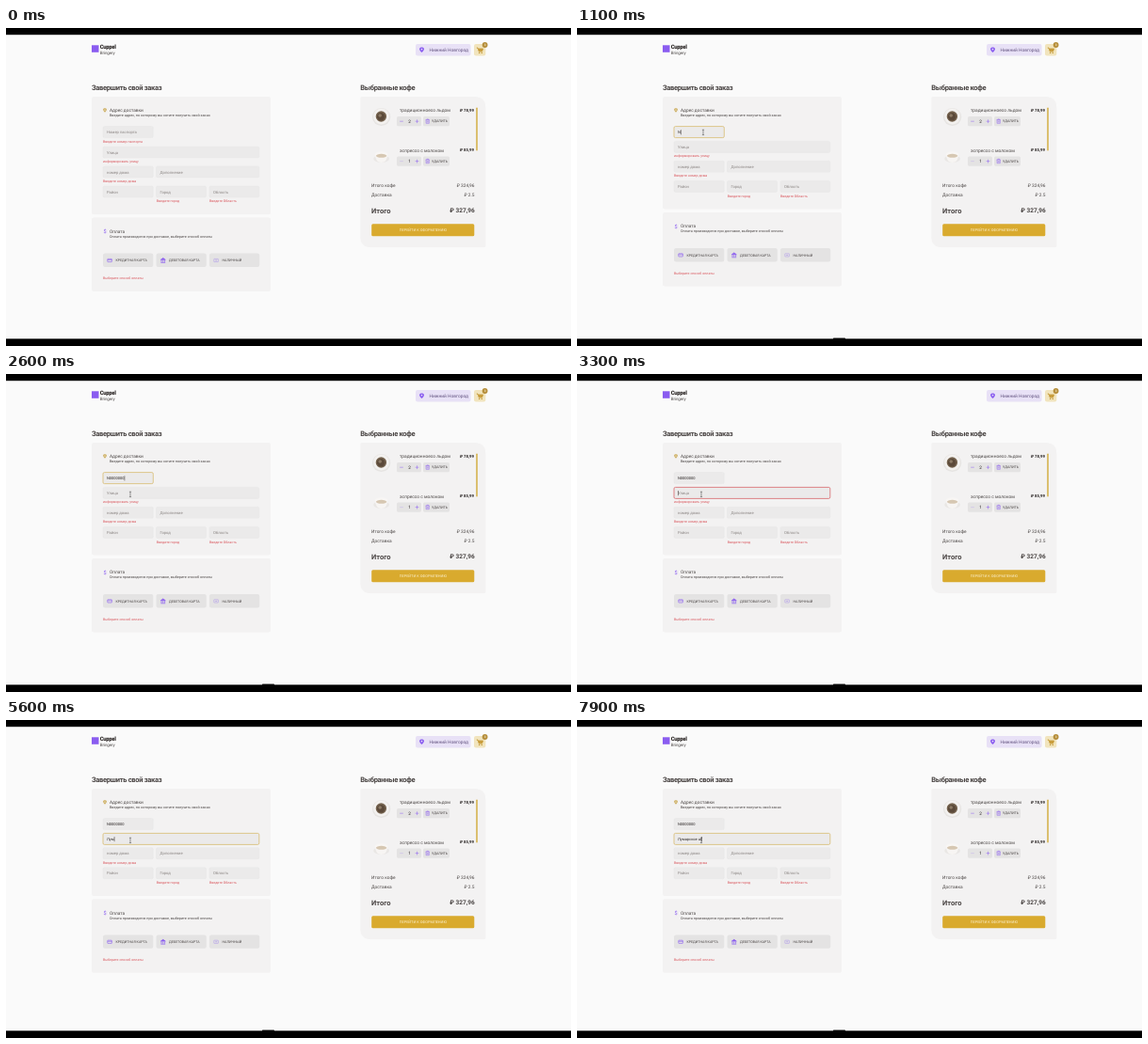
An HTML page for the animation above (8000 ms loop, 600x338 px).

```html
<!DOCTYPE html>
<html lang="ru">
<head>
<meta charset="utf-8">
<title>Оформление заказа</title>
<style>
html, body { margin: 0; width: 100%; height: 100%; overflow: hidden; background: #fafafa; }
svg { display: block; }
text { font-family: Roboto, "Noto Sans", sans-serif; text-rendering: geometricPrecision; white-space: pre; }
.head { font-weight: 600; letter-spacing: -.34px; }
.bold { font-weight: 700; }
.logo { font-weight: 800; letter-spacing: -.4px; }
.tight { letter-spacing: -.1px; }
</style>
</head>
<body>
<svg id="stage" width="600" height="338" viewBox="0 0 600 338"></svg>
<script>
const LOOP = 8000, ROW = 5.6;
const INK = '#4a4544', DARK = '#2c2726', HINT = '#8c8684', FIELD = '#ebeaea', LINE = '#e3e2e2',
  BUTTON = '#e4e3e3', CARD = '#f3f2f2', PURPLE = '#8a5cf0', GOLD = '#d9aa2e', RED = '#d9545b',
  FOCUS = '#d9bc72', ALERT = '#d8676c';
const PASSPORT = 'N0000000', PASSPORT_KEYS = [1100, 1500, 1600, 1700, 1800, 1900, 2000, 2100];
const STREET = 'Лумарское ш', STREET_KEYS = [5000, 5300, 5500, 5900, 6800, 6900, 7000, 7200, 7300, 7700, 7900];
const PASSPORT_FOCUS = 500, STREET_FOCUS = 3000;

const stage = document.getElementById('stage');
const pen = document.createElement('canvas').getContext('2d');

const rect = (x, y, w, h, fill, r = 0, extra = '') =>
  `<rect x="${x}" y="${y}" width="${w}" height="${h}" rx="${r}" fill="${fill}" ${extra}/>`;
const circle = (x, y, r, fill) => `<circle cx="${x}" cy="${y}" r="${r}" fill="${fill}"/>`;
const ellipse = (x, y, rx, ry, fill) => `<ellipse cx="${x}" cy="${y}" rx="${rx}" ry="${ry}" fill="${fill}"/>`;
const path = (d, stroke, width = .8, fill = 'none') =>
  `<path d="${d}" stroke="${stroke}" stroke-width="${width}" fill="${fill}"/>`;
// y is the middle of the capitals
const text = (s, x, y, size, fill = INK, cls = '', anchor = 'start') =>
  `<text x="${x}" y="${y + size * .355}" font-size="${size}" fill="${fill}" class="${cls}" text-anchor="${anchor}">${s}</text>`;
const shift = (dy, s) => `<g transform="translate(0 ${dy})">${s}</g>`;
const pin = (x, y, size, fill, hole) =>
  `<g transform="translate(${x} ${y}) scale(${size})">` +
  path('M0 3C-5 -1.5 -2 -3.2 0 -3.2S5 -1.5 0 3Z', 'none', 0, fill) + circle(0, -.8, .9, hole) + '</g>';
const error = (s, x, y) => text(s, x, y, 3.6, RED);
const typed = (s, keys, t) => s.slice(0, keys.filter(k => k <= t).length);

function field(x, y, w, hint, value = '', focused = false) {
  const border = !focused ? LINE : value ? FOCUS : ALERT;
  let s = rect(x, y, w, 12, FIELD, 1.5, `stroke="${border}" stroke-width="${focused ? .8 : .4}"`);
  s += value ? text(value, x + 4, y + 6.2, 4, DARK) : text(hint, x + 4, y + 6.2, 4.15, HINT);
  if (focused) {
    pen.font = '40px Roboto, "Noto Sans", sans-serif';
    s += rect(x + 4.1 + pen.measureText(value).width / 10, y + 3.6, .5, 5.2, DARK);
  }
  return s;
}

function payButton(x, w, label, icon) {
  return rect(x, 239.6, w, 14.4, BUTTON, 2) + icon + text(label, x + 13.5, 247, 3.6, INK);
}

function banknote(x, y, stroke) {
  return rect(x, y, 4.6, 3.2, 'none', .4, `stroke="${stroke}" stroke-width=".6"`);
}

function item(y, name, count, price) {
  const mid = y + 11.8, minus = count > 1 ? PURPLE : '#c3b2ea';
  return text(name, 418, y, 4.85) +
    text(price, 497, y, 4.3, DARK, 'bold', 'end') +
    rect(415, y + 6.7, 26, 10.2, BUTTON, 1.6) +
    path(`M418.2 ${mid}h3.6`, minus, .5) +
    text(count, 428.6, mid, 4.7, DARK, '', 'middle') +
    path(`M434.6 ${mid}h3.8m-1.9 -1.9v3.8`, PURPLE, .5) +
    rect(443, y + 6.7, 28, 10.2, BUTTON, 1.6) +
    path(`M445.6 ${mid - 1.6}h4.2m-2.9 0v-.7h1.6v.7m-2.4 0v3.7h3.2v-3.7m-2.1 1v1.8m1 0v-1.8`, PURPLE, .5) +
    text('УДАЛИТЬ', 452, mid, 3.65);
}

function header() {
  return rect(91, 18.3, 7.5, 7.5, PURPLE) +
    text('Cuppel', 99.8, 20, 6, DARK, 'logo') +
    text('Bringery', 99.8, 26.1, 4.5, INK, 'tight') +
    rect(435, 17, 58.5, 12.6, '#e8e1f6', 2) + pin(441.5, 23.4, .9, PURPLE, '#e8e1f6') +
    text('Нижний Новгород', 449.5, 23.4, 4.85, '#62537f') +
    rect(497, 17, 12.3, 12.6, '#f1e4bd', 2) +
    path('M499.8 21h1.2l1.2 4h3.4l.9-3h-5', '#c0942f', .7, '#cba040') +
    circle(502.6, 26.4, .7, '#c0942f') + circle(505.3, 26.4, .7, '#c0942f') +
    circle(508.6, 18, 2.9, '#b68f3c') + text('3', 508.6, 18, 3.2, '#f6ecd2', 'bold', 'middle') +
    text('Завершить свой заказ', 91, 63.5, 7.6, INK, 'head') +
    text('Выбранные кофе', 376.3, 63.5, 7.6, INK, 'head');
}

function basket() {
  return path('M378 73H497.5Q509.3 73 509.3 85V231.3Q509.3 233.3 507.3 233.3H388Q376.3 233.3 376.3 221.5V75Q376.3 73 378 73Z', 'none', 0, CARD) +
    circle(398.6, 94.5, 9.6, '#e6e4e2') + circle(398.6, 94, 8.5, '#f3f1ef') +
    circle(398.4, 94, 5.7, '#75634f') + circle(398.2, 94.2, 4.2, '#5c4a3a') + circle(397.2, 93, 1.8, '#8d7b66') +
    ellipse(398.6, 139, 8.4, 4, '#e9e7e5') +
    path('M392 134.5Q392.5 143 398.6 143T405.2 134.5Z', 'none', 0, '#f7f5f3') +
    ellipse(398.6, 134.6, 6.7, 3.4, '#f8f6f4') + ellipse(398.6, 135.8, 5.7, 2, '#d6c7b2') +
    item(87.4, 'традиционноесо льдом', 2, '₽ 78,99') +
    item(129.8, 'эспрессо с молоком', 1, '₽ 85,99') +
    rect(499.2, 84.5, 1.6, 46, '#d5b24e', .8) +
    text('Итого кофе', 388, 166.8, 4.8) + text('₽ 324,96', 497.5, 166.8, 4.8, INK, '', 'end') +
    text('Доставка', 388, 177.6, 4.8) + text('₽ 2.5', 497.5, 177.6, 4.8, INK, '', 'end') +
    text('Итого', 388, 194, 7.5, INK, 'bold') + text('₽ 327,96', 497.8, 194, 6.5, INK, 'bold', 'end') +
    rect(388.2, 208.2, 109.1, 13, GOLD, 1.5) +
    text('ПЕРЕЙТИ К ОФОРМЛЕНИЮ', 442.8, 214.7, 3.9, '#fbf0d0', '', 'middle');
}

function address(passport, street, t) {
  const a = passport ? -ROW : 0, b = a - (street ? ROW : 0);
  return rect(91, 73, 190, 125.2 + b, CARD, 2) +
    pin(105, 87.6, .7, '#ceb063', CARD) +
    text('Адрес доставки', 110, 87.6, 4.75) +
    text('Введите адрес, по которому вы хотите получить свой заказ', 110, 92.9, 3.8) +
    field(103, 104.6, 53.3, 'Номер паспорта', passport, t >= PASSPORT_FOCUS && t < STREET_FOCUS) +
    (passport ? '' : error('Введите номер паспорта', 103, 120.5)) +
    shift(a, field(103, 126, 165.8, 'Улица', street, t >= STREET_FOCUS) +
      (street ? '' : error('информировать улицу', 103, 141.5))) +
    shift(b, field(103, 146.9, 53.3, 'номер дома') + field(159.5, 146.9, 109.3, 'Дополнение') +
      error('Введите номер дома', 103, 162.6) +
      field(103, 168, 53.3, 'Район') + field(159.5, 168, 53, 'Город') + field(216, 168, 52.8, 'Область') +
      error('Введите город', 159.8, 184) + error('Введите Область', 216, 184)) +
    shift(b, payment());
}

function payment() {
  return rect(91, 201.5, 190, 78.5, CARD, 2) +
    text('$', 105, 216.4, 5.6, PURPLE, '', 'middle') +
    text('Оплата', 110, 216.3, 4.75) +
    text('Оплата производится при доставке, выберите способ оплаты', 110, 221.6, 3.75) +
    payButton(103, 53.3, 'КРЕДИТНАЯ КАРТА', banknote(107.8, 245.4, PURPLE) + path('M107.8 246.5h4.6', PURPLE, .6)) +
    payButton(159.5, 53.3, 'ДЕБЕТОВАЯ КАРТА',
      path('M164.3 246.3l2.5 -1.8l2.5 1.8zm.7 .4v2.2m1.8 0v-2.2m1.8 0v2.2m-4.2 .5h4.8', PURPLE, .7, PURPLE)) +
    payButton(216, 53.2, 'НАЛИЧНЫЙ', banknote(220.8, 245.4, '#b4a0e8') + circle(223.1, 247, .7, '#b4a0e8')) +
    error('Выберите способ оплаты', 103, 266);
}

function pointer(t) {
  if (t < PASSPORT_FOCUS - 200) return '';
  const p = Math.min(1, Math.max(0, (t - 2200) / 300)), e = p * p * (3 - 2 * p);
  return path(`M${134 - 2 * e - 1.1} ${110.9 + 17 * e - 2.7}h2.2m-1.1 0v5.4m-1.1 0h2.2`, '#3c3c3c', .5);
}

function draw(t) {
  stage.innerHTML = rect(0, 0, 600, 338, '#fafafa') + header() + basket() +
    address(typed(PASSPORT, PASSPORT_KEYS, t), typed(STREET, STREET_KEYS, t), t) +
    rect(0, 0, 600, 7.2, '#000') + rect(0, 330.3, 600, 7.7, '#000') +
    (t < PASSPORT_FOCUS ? '' : rect(272, 329.5, 13, 2, '#000', .5)) + pointer(t);
}

const start = performance.now();
function frame() {
  // the screen advances in steps of 100 ms
  const t = (performance.now() - start) % LOOP;
  draw(Math.floor(t / 100) * 100);
  requestAnimationFrame(frame);
}
frame();
</script>
</body>
</html>
```
